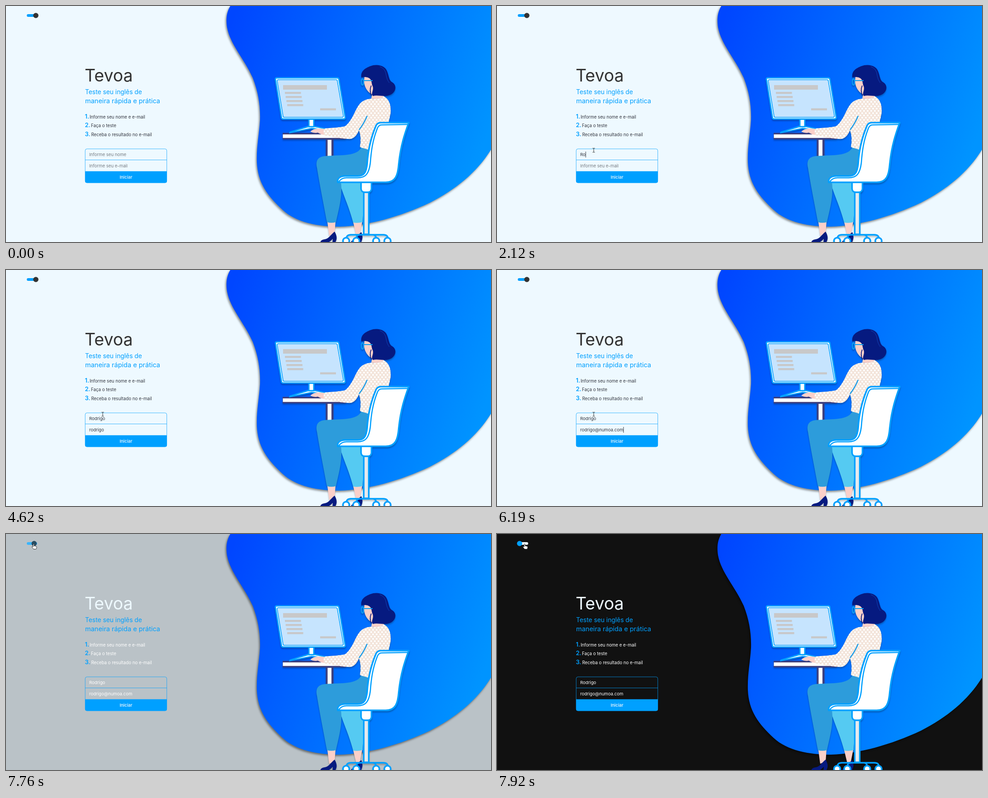
These frames come from a looping animation (1073 by 522 pixels, 7990 ms). An HTML page with a canvas:

```html
<!DOCTYPE html>
<html lang="pt-BR">
<head>
<meta charset="utf-8">
<title>Tevoa</title>
<style>
html, body { margin: 0; width: 100%; height: 100%; overflow: hidden; background: #eef9ff; }
canvas { display: block; width: 1073px; height: 522px; }
</style>
</head>
<body>
<canvas id="stage"></canvas>
<script>
const W = 1073, H = 522, LOOP = 7990;
const BLUE = '#00a0ff', NAVY = '#061a80', SKIN = '#fbd0c9', DESK = '#3d3f7e', GREY = '#c8c8c9';
const FONT = 'Inter, "Open Sans", sans-serif';
const NAME = 'Rodrigo', MAIL = 'rodrigo@numoa.com';
const NAME_KEYS = [1880, 2120, 2360, 2440, 2520, 2670, 2750];
const MAIL_KEYS = [3300, 3460, 3620, 3700, 3770, 4000, 4080, 4860, 5320,
  5400, 5480, 5560, 5720, 5880, 5950, 6110, 6190];
const CARETS = [
  [[1100, 1570], [1880, 2910]],
  [[2910, 4620], [4860, 6740], [7130, 7600]]
];
// Pointer routes: time, x, y of the hotspot
const TO_FORM = [[70, 962, 503], [228, 735, 415], [386, 470, 325], [544, 265, 275],
  [702, 186, 294], [860, 211, 318], [1020, 214, 319]];
const TO_SWITCH = [[6740, 213, 313], [6974, 165, 205], [7208, 88, 52],
  [7364, 62, 5], [7520, 61, 21.5]];

const dpr = window.devicePixelRatio || 1;
const stage = document.getElementById('stage');

function prepare(canvas) {
  canvas.width = W * dpr;
  canvas.height = H * dpr;
  const c = canvas.getContext('2d');
  c.scale(dpr, dpr);
  return c;
}

function layer(draw) {
  const canvas = document.createElement('canvas');
  draw(prepare(canvas));
  return canvas;
}

function shape(c, d, fill, stroke, width) {
  const p = new Path2D(d);
  if (fill) { c.fillStyle = fill; c.fill(p); }
  if (stroke) { c.strokeStyle = stroke; c.lineWidth = width; c.stroke(p); }
  return p;
}

function box(c, x, y, w, h, fill) {
  c.fillStyle = fill;
  c.fillRect(x, y, w, h);
}

function disc(c, x, y, r, fill, stroke, width) {
  c.beginPath();
  c.arc(x, y, r, 0, Math.PI * 2);
  c.fillStyle = fill;
  c.fill();
  if (stroke) { c.strokeStyle = stroke; c.lineWidth = width; c.stroke(); }
}

function drawBlob(c) {
  const g = c.createLinearGradient(490, 60, 1073, 260);
  g.addColorStop(0, '#0046ff');
  g.addColorStop(1, '#0094ff');
  shape(c, `M500 -6 C488 11 486 27 489 47 C496 85 526 115 546 159 C558 190 563 220 562 252
    C560 285 554 310 555 345 C557 392 579 420 612 451 C642 479 690 488 739 488
    C800 486 872 466 938 435 C1000 403 1048 363 1080 306 V-6 Z`, g);
}

function drawDesk(c) {
  box(c, 707.5, 294, 17, 40, DESK);
  box(c, 711.5, 296, 8.5, 38, '#fff');
  box(c, 612, 280.5, 140, 14.5, DESK);
  box(c, 612.5, 284, 139, 7.8, '#fff');
  shape(c, 'M626 282 L627 278 L668 265 H683 L719 273 V278 L676 272 Z', BLUE);
  shape(c, 'M639 277 L671 267.5 H681 L710 273 L676 269.5 Z', '#fff');
  shape(c, 'M670 250 V267 H681 V250 Z', '#fff', BLUE, 3);
  shape(c, 'M599 159 H733 Q736 159 736.5 161.5 L750.5 246 Q751 250 747 250 H613 Q610 250 609.5 247.5 L596 162.5 Q595.5 159 599 159 Z', '#fff', BLUE, 3);
  shape(c, 'M602 163 H730 Q732.5 163 733 165.5 L746.5 243 Q746.5 246.3 743.5 246.3 H616 Q613.5 246.3 613 244 L600 166 Q600 163 602 163 Z', '#c6e4fe', BLUE, 1.6);
  box(c, 613, 175, 97, 10, GREY);
  for (let i = 0; i < 4; i++) box(c, 617 + i * 1.7, 190 + i * 9, 35.5, 4.5, GREY);
  box(c, 695, 226.3, 35, 4.5, GREY);
}

function drawLegs(c) {
  shape(c, 'M768 478 H788 L783 503 L775 507 Z M711 478 H729 L727 504 L715 508 Z', SKIN);
  shape(c, 'M762 525 Q764 518 773 514 Q777 508 786 500 Q790 508 788 516 L785 525 Z', NAVY);
  shape(c, 'M695 525 Q695 517 705 516 C714 515 717 507 727 499 Q733 509 731 517 L728 525 H722 L723 515 Q715 523 709 525 Z', NAVY);
  shape(c, 'M738 389 C744 415 758 440 768 479 Q778 481 789 478 C790 453 796 428 797 389 Z', '#55caf2');
  shape(c, `M786 312 C778 333 743 329 705 332 C688 334 685 344 688 358 C693 390 702 435 710 478
    Q719 481 730 478 C736 450 745 421 741 389 L738 378 L799 376 L804 316 Z`, '#2d9cdb');
}

function drawBody(c) {
  shape(c, 'M673 278 Q680 271 691 271 L706 272 L705 285 Q697 285 690 280 Q682 282 673 278 Z', SKIN);
  const blouse = `M807 205 Q822 207 836 200 C848 206 852 219 851 237 L844 268 L804 318 Q795 316 783 312
    Q787 292 781 275 C774 291 766 295 756 294 Q728 291 704 286 Q701 278 705 271
    C723 269 738 269 750 266 C768 253 772 226 786 213 Q795 206 807 205 Z`;
  c.save();
  c.clip(shape(c, blouse, '#f3e4da'));
  for (let row = 0; row < 24; row++) {
    for (let x = 700 + (row % 2) * 4; x < 856; x += 8) disc(c, x, 202 + row * 5, 2.1, '#fff');
  }
  c.restore();
  shape(c, 'M799 243 Q792 260 781 274', null, '#1b9be6', 2.4);
  shape(c, 'M811 190 L834 192 L836 200 Q824 207 808 205 Z', SKIN);
  shape(c, 'M793 157 L814 155 L817 187 L810 196 Q802 191 798 185 Q793 177 792 168 Z', SKIN);
  shape(c, `M786 156 C785 141 799 136 806 133 C821 127 839 132 843 144 C848 156 847 165 855 169
    C867 177 861 193 849 197 C836 202 823 196 812 199 C806 194 815 186 811 177
    C808 170 810 161 800 158 Q792 156 786 158 Z`, NAVY);
  shape(c, 'M808 176 Q803 188 809 198', null, NAVY, 1.8);
  shape(c, 'M827 134 Q840 139 841 153 Q843 164 848 170', null, '#164bc2', .8);
  shape(c, 'M791 165 H811', null, '#0c9ff0', 2);
  c.beginPath();
  c.ellipse(788.7, 168, 2.6, 7, 0, 0, Math.PI * 2);
  c.strokeStyle = '#0c9ff0';
  c.lineWidth = 2.2;
  c.stroke();
}

function drawChair(c) {
  c.lineJoin = c.lineCap = 'round';
  shape(c, 'M791.5 410 H802.5 V505 H791.5 Z', '#e6e9ed', BLUE, 3.4);
  shape(c, 'M785.5 388 H808.5 V404 Q808 412 800 412 H794 Q786 412 785.5 404 Z', '#fff', BLUE, 3.4);
  shape(c, 'M753 515 Q753 506 763 506 H835 Q845 506 845 515 M775 513 Q776 506 783 506 M819 513 Q818 506 811 506', null, BLUE, 3.4);
  for (const x of [752.5, 775, 819, 844]) disc(c, x, 519.5, 7, '#fff', BLUE, 3.6);
  shape(c, `M829 258 H891 C883 280 873 309 869 349 C867 375 862 390 840 390 H734
    C732 382 739 376 750 376 H778 C793 376 797 367 799 349 C801 316 808 290 818 266 Q821 258 829 258 Z`, '#fff', BLUE, 3.6);
  shape(c, 'M887 262 L831 263 Q824 263 821 272 C811 298 808 320 806 347 C803 372 795 380 778 380 H753 Q742 380 736 389', null, BLUE, 2.6);
}

const blob = layer(drawBlob);
const scene = layer(c => [drawDesk, drawLegs, drawBody, drawChair].forEach(draw => draw(c)));

function place(c, image, dx, dy, blur, alpha) {
  c.save();
  c.shadowColor = `rgba(0,0,0,${alpha})`;
  c.shadowOffsetX = dx * dpr;
  c.shadowOffsetY = dy * dpr;
  c.shadowBlur = blur * dpr;
  c.drawImage(image, 0, 0, W, H);
  c.restore();
}

// Moving parts advance in even steps
const snap = (t, start, step) => start + Math.floor((t - start) / step) * step;

function along(route, t) {
  const last = route.length - 1;
  if (t >= route[last][0]) return route[last].slice(1);
  let i = 0;
  while (t >= route[i + 1][0]) i++;
  const at = k => route[Math.max(0, Math.min(last, k))];
  const [a, b, d, e] = [at(i - 1), at(i), at(i + 1), at(i + 2)];
  const u = (t - b[0]) / (d[0] - b[0]);
  return [1, 2].map(k => b[k] + .5 * u * (d[k] - a[k]
    + u * (2 * a[k] - 5 * b[k] + 4 * d[k] - e[k] + u * (3 * (b[k] - d[k]) + e[k] - a[k]))));
}

// CSS "ease" timing curve
function ease(x) {
  if (x <= 0) return 0;
  if (x >= 1) return 1;
  const cubic = (a, b, s) => 3 * a * s * (1 - s) ** 2 + 3 * b * s * s * (1 - s) + s ** 3;
  let lo = 0, hi = 1;
  for (let i = 0; i < 20; i++) {
    const mid = (lo + hi) / 2;
    if (cubic(.25, .25, mid) < x) lo = mid; else hi = mid;
  }
  return cubic(.1, 1, lo);
}

function mix(a, b, k) {
  return `rgb(${a.map((v, i) => Math.round(v + (b[i] - v) * k))})`;
}

const ctx = prepare(stage);

function label(s, x, y, size, weight, color, align = 'left') {
  ctx.font = `${weight} ${size}px ${FONT}`;
  ctx.textAlign = align;
  ctx.fillStyle = color;
  ctx.fillText(s, x, y);
}

function field(i, t, value, keys, hint, y, ink) {
  const typed = value.slice(0, keys.filter(k => t >= k).length);
  label(typed || hint, 184, y, 9.6, 400, typed ? ink : '#757b80');
  if (CARETS[i].some(([on, off]) => t >= on && t < off)) {
    box(ctx, 184 + (typed ? ctx.measureText(typed).width : 0), y - 9.5, 1, 13, ink);
  }
}

function drawForm(t, dark) {
  const ink = dark ? '#fff' : '#33363f';
  label('Tevoa', 174, 166.5, 37.5, 400, dark ? '#eef9ff' : '#333');
  label('Teste seu inglês de', 175, 195, 13.8, 400, BLUE);
  label('maneira rápida e prática', 175, 215, 14.5, 400, BLUE);
  const steps = [['Informe seu nome e e-mail', 185], ['Faça o teste', 188], ['Receba o resultado no e-mail', 188.5]];
  steps.forEach(([s, x], i) => {
    const y = 248.5 + i * 19.8;
    label(i + 1 + '.', 174.5, y, 13, 600, BLUE);
    label(s, x, y, 9.7, 400, ink);
  });
  ctx.beginPath();
  ctx.roundRect(175, 365.5, 181, 25.8, [0, 0, 4, 4]);
  ctx.fillStyle = BLUE;
  ctx.fill();
  ctx.beginPath();
  ctx.roundRect(175.2, 316, 180.5, 75, 4);
  ctx.strokeStyle = BLUE;
  ctx.lineWidth = .75;
  ctx.stroke();
  box(ctx, 175, 340.2, 181, .75, BLUE);
  field(0, t, NAME, NAME_KEYS, 'Informe seu nome', 331.5, ink);
  field(1, t, MAIL, MAIL_KEYS, 'Informe seu e-mail', 356.5, ink);
  label('Iniciar', 265.5, 382, 9.5, 600, '#dceffb', 'center');
}

function drawSwitch(k) {
  ctx.beginPath();
  ctx.roundRect(46, 18, 23, 6, 3);
  ctx.fillStyle = mix([0, 160, 255], [240, 248, 255], k);
  ctx.fill();
  disc(ctx, 66 - 16 * k, 21, 5.8, mix([51, 51, 51], [0, 160, 255], k));
}

function drawPointer(t) {
  if (t < 70) return;
  let x, y;
  if (t < 6740) {
    [x, y] = along(TO_FORM, t < 940 ? snap(t, 70, 79) : snap(t, 940, 80));
  } else {
    [x, y] = along(TO_SWITCH, t < 7600 ? snap(t, 6740, 78) : t);
  }
  ctx.save();
  ctx.translate(x, y);
  ctx.lineJoin = 'round';
  if (x > 175 && x < 356 && y > 312 && y < 365) {
    shape(ctx, 'M-2.5 -4.5 H-.8 L0 -3.8 L.8 -4.5 H2.5 M0 -4 V4 M-2.5 4.5 H-.8 L0 3.8 L.8 4.5 H2.5', null, '#333', 1);
  } else if (t >= 7520) {
    shape(ctx, `M-1 1 Q0 -.5 1.2 1 V5 Q2.4 4.2 3 5.3 Q4.4 4.6 5 5.8 Q6.5 5.3 6.8 7
      V9 Q6.5 10.5 5.5 12 H0 Q-1.2 10 -3.3 8 Q-4.2 6.4 -2.8 6 L-1 7.2 Z`, '#fff', '#222', .9);
  } else {
    shape(ctx, 'M0 0 V11 L2.6 8.6 L4.4 12.6 L6.2 11.8 L4.5 8 H8 Z', '#fff', '#111', .8);
  }
  ctx.restore();
}

function render(t) {
  const k = ease((snap(t, 7600, 80) - 7726.5) / 193);
  box(ctx, 0, 0, W, H, mix([238, 249, 255], [17, 17, 17], k));
  place(ctx, blob, -2, 3, 4, .45);
  place(ctx, scene, 0, 3, 3, .25);
  drawForm(t, k > 0);
  drawSwitch(k);
  drawPointer(t);
}

function tick() {
  render(performance.now() % LOOP);
  requestAnimationFrame(tick);
}
tick();
</script>
</body>
</html>
```
